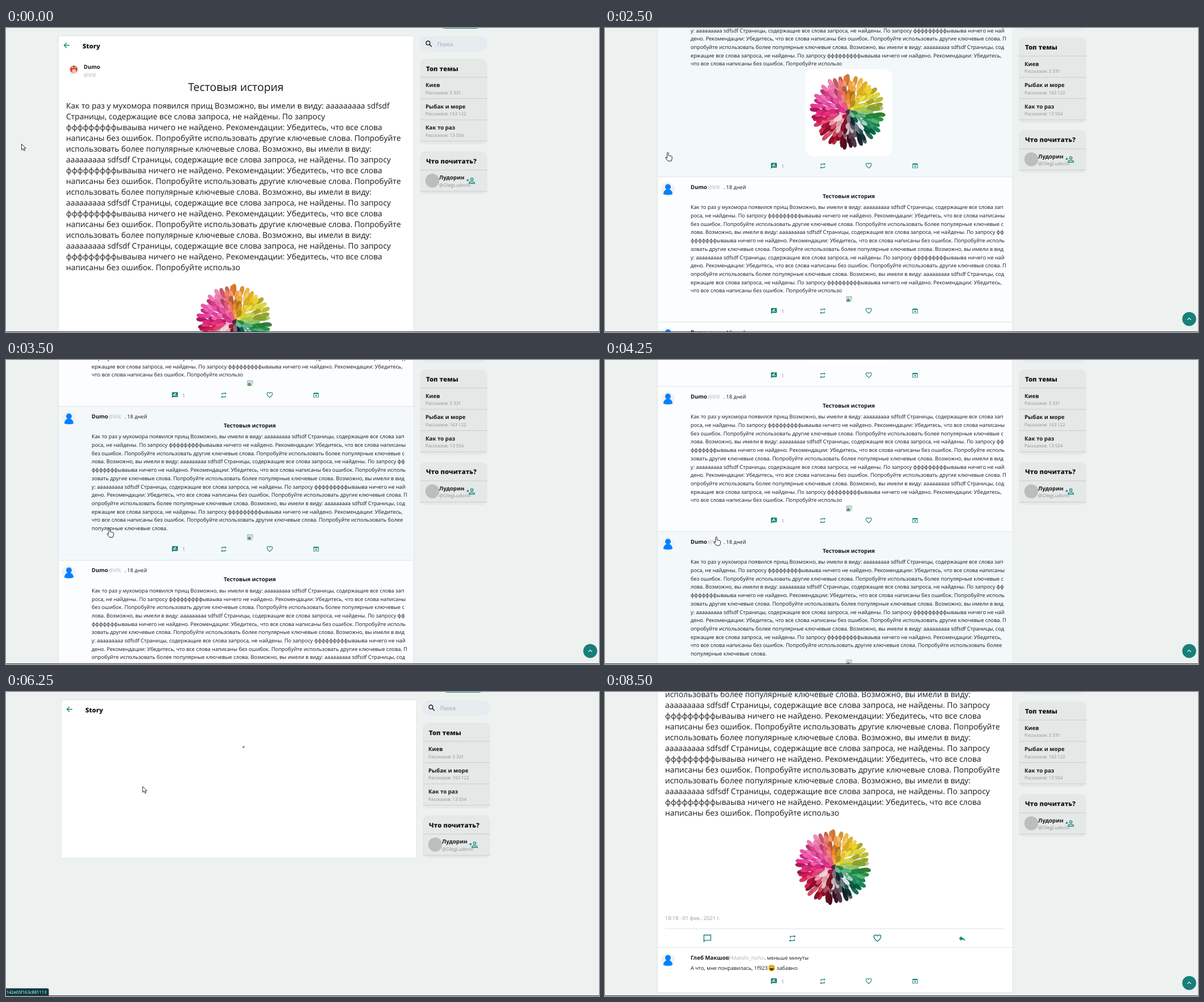
Write an HTML page that moves like this. It is 1046x536 px and loops after 8.75 s.

```html
<!DOCTYPE html>
<html lang="ru">
<head>
<meta charset="utf-8">
<title>Story feed</title>
<style>
  html, body { margin: 0; width: 100%; height: 100%; overflow: hidden; background: #edf1f0; }
  svg { display: block; width: 100vw; height: 100vh; }
  text { font-family: "Open Sans", "Noto Sans", sans-serif; text-rendering: geometricPrecision; }
</style>
</head>
<body>
<svg id="stage" viewBox="0 0 1046 536"></svg>
<script>
const LOOP = 8750;
const FAMILY = '"Open Sans", "Noto Sans", sans-serif';
const TEAL = '#17807a', INK = '#14181b', GRAY = '#8b8f90', PALE = '#adb0b1', LINE = '#dfe5e5';
const TITLE = 'Тестовыя история';
const USER = 'Dumo', HANDLE = '@Vilt';

// ---- copy ----
const found = 'Страницы, содержащие все слова запроса, не найдены. По запросу';
const advice = [
  'фффффффффываыва ничего не найдено. Рекомендации: Убедитесь, что все слова',
  'написаны без ошибок. Попробуйте использовать другие ключевые слова. Попробуйте',
  'использовать более популярные ключевые слова. Возможно, вы имели в виду:',
];
const again = 'ааааааааа sdfsdf ' + found;
const storyLines = [
  'Как то раз у мухомора появился прищ Возможно, вы имели в виду: ааааааааа sdfsdf',
  found, ...advice, again, ...advice, again, ...advice, again, advice[0],
  'написаны без ошибок. Попробуйте использо',
];
const postLines = [
  'Как то раз у мухомора появился прищ Возможно, вы имели в виду: ааааааааа sdfsdf Страницы, содержащие все слова зап',
  'роса, не найдены. По запросу фффффффффываыва ничего не найдено. Рекомендации: Убедитесь, что все слова написаны',
  'без ошибок. Попробуйте использовать другие ключевые слова. Попробуйте использовать более популярные ключевые с',
  'лова. Возможно, вы имели в виду: ааааааааа sdfsdf Страницы, содержащие все слова запроса, не найдены. По запросу фф',
  'фффффффываыва ничего не найдено. Рекомендации: Убедитесь, что все слова написаны без ошибок. Попробуйте исполь',
  'зовать другие ключевые слова. Попробуйте использовать более популярные ключевые слова. Возможно, вы имели в вид',
  'у: ааааааааа sdfsdf Страницы, содержащие все слова запроса, не найдены. По запросу фффффффффываыва ничего не най',
  'дено. Рекомендации: Убедитесь, что все слова написаны без ошибок. Попробуйте использовать другие ключевые слова. П',
  'опробуйте использовать более популярные ключевые слова. Возможно, вы имели в виду: ааааааааа sdfsdf Страницы, сод',
  'ержащие все слова запроса, не найдены. По запросу фффффффффываыва ничего не найдено. Рекомендации: Убедитесь,',
];
const shortEnd = ['что все слова написаны без ошибок. Попробуйте использо'];
const longEnd = [
  'что все слова написаны без ошибок. Попробуйте использовать другие ключевые слова. Попробуйте использовать более',
  'популярные ключевые слова.',
];

// ---- type: one size ratio per weight, so the face sets as wide as the design ----
const ruler = document.createElement('canvas').getContext('2d');
function face(weight, sample, width, size) {
  ruler.font = `${weight} 100px ${FAMILY}`;
  return { weight, ratio: width / size / (ruler.measureText(sample).width / 100) };
}
const REGULAR = face(400, advice[1], 591, 14.3);
const BOLD = face(700, TITLE, 92, 9.5);
const HEAVY = face(800, 'Что почитать?', 89, 13);

const text = (x, y, str, size, { weight, ratio } = REGULAR, fill = INK, anchor = 'start') =>
  `<text x="${x}" y="${y}" font-size="${(size * ratio).toFixed(3)}" font-weight="${weight}" fill="${fill}" text-anchor="${anchor}">${str}</text>`;
const paragraph = (x, y, lines, size, pitch) =>
  lines.map((line, i) => text(x, y + i * pitch, line, size)).join('');

// ---- shapes ----
const rect = (x, y, w, h, fill, rx = 0, extra = '') =>
  `<rect x="${x}" y="${y}" width="${w}" height="${h}" rx="${rx}" fill="${fill}" ${extra}/>`;
const circle = (x, y, r, fill) => `<circle cx="${x}" cy="${y}" r="${r}" fill="${fill}"/>`;
const rule = (x, y, w, color = LINE) => rect(x, y - 0.5, w, 1, color);
const group = (id, body, extra = '') => `<g id="${id}" ${extra}>${body}</g>`;
const use = (id, x, y) => `<use href="#${id}" x="${x}" y="${y}"/>`;

const solid = {
  review: 'M20 2H4Q2 2 2 4V22l4-4h14q2 0 2-2V4q0-2-2-2zM6 14v-2.5l7.2-7 2.5 2.4L8.5 14zm12 0h-7.5l2-2H18z',
  repeat: 'M7 7h10v3l4-4-4-4v3H5v6h2zm10 10H7v-3l-4 4 4 4v-3h12v-6h-2z',
  browser: 'M19 4H5Q3 4 3 6v12q0 2 2 2h4v-2H5V8h14v10h-4v2h4q2 0 2-2V6q0-2-2-2zm-7 6l-4 4h3v6h2v-6h3z',
  reply: 'M10 9V5l-7 7 7 7v-4.1c5 0 8.5 1.6 11 5.1-1-5-4-10-11-11z',
};
const outline = {
  back: 'M20 12H5M12 4.7L4.7 12l7.3 7.3',
  search: 'M15 9.5a5.5 5.5 0 1 0-11 0 5.5 5.5 0 0 0 11 0M13.5 13.5L20 20',
  heart: 'M12 20C5 14 3 11.5 3 8.5A4.6 4.6 0 0 1 12 6.5 4.6 4.6 0 0 1 21 8.5C21 11.5 19 14 12 20z',
  chat: 'M3 3h18v14H6l-3 3z',
  addPerson: 'M19 8a3.5 3.5 0 1 0-7 0 3.5 3.5 0 0 0 7 0M8 20v-2q1-3 7.5-3t7.5 3v2zM4 7.5v7M.5 11h7',
  up: 'M6 15l6-6 6 6',
};
function icon(kind, x, y, size, color = TEAL) {
  const place = `transform="translate(${x - size / 2} ${y - size / 2}) scale(${size / 24})"`;
  return solid[kind]
    ? `<path d="${solid[kind]}" fill="${color}" fill-rule="evenodd" ${place}/>`
    : `<path d="${outline[kind]}" fill="none" stroke="${color}" stroke-width="2.1" ${place}/>`;
}

// ---- flower: rings of petals coloured by their angle ----
const petalHues = [
  [0, 245, 140, 45], [45, 243, 214, 35], [78, 190, 205, 50], [100, 35, 165, 75], [130, 10, 125, 90],
  [155, 25, 40, 55], [180, 80, 18, 40], [205, 185, 18, 45], [245, 222, 20, 75],
  [290, 240, 50, 160], [330, 240, 85, 150], [360, 245, 140, 45],
];
function petalColor(angle, light) {
  const i = petalHues.findIndex(([a]) => a > angle);
  const [a0, ...from] = petalHues[i - 1], [a1, ...to] = petalHues[i];
  const k = (angle - a0) / (a1 - a0);
  const mixed = from.map((c, j) => {
    const v = c + (to[j] - c) * k;
    return Math.round(light > 0 ? v + (255 - v) * light : v * (1 + light));
  });
  return `rgb(${mixed})`;
}
function flower() {
  let seed = 7;
  const random = () => (seed = (seed * 16807) % 2147483647) / 2147483647;
  let out = '';
  for (let r = 54; r > 4; r -= 8) {
    const count = Math.round(r * 0.65 + 5);
    for (let i = 0; i < count; i++) {
      const angle = ((i + random() * 0.7) * 360 / count) % 360;
      const reach = r + random() * 6 - 3;
      const glow = r < 36 && angle > 120 && angle < 270 ? 0.4 : 0;
      const light = random() * 0.6 - 0.3 + glow * random() * 1.8;
      out += `<path d="M0 11Q-5.5 1-3-8Q0-13 3-8Q5.5 1 0 11z" fill="${petalColor(angle, light)}" stroke="#000" stroke-opacity=".18" stroke-width=".6" transform="rotate(${angle.toFixed(1)}) translate(0 ${(-reach).toFixed(1)})"/>`;
    }
  }
  return out + circle(0, 0, 3.5, '#253c38');
}

const defs = `<defs>
  ${group('flower', rect(-75, -76, 154, 154, '#fff', 15) + flower())}
  ${group('person', circle(0, 0, 12, '#eff2f4') + circle(0, -4.2, 5, '#0080ff') +
    '<path d="M-8 8.5C-8 3-4-.5 0-.5S8 3 8 8.5Q0 11-8 8.5z" fill="#0080ff"/>')}
  ${group('missing', rect(-4.5, -4.5, 9, 9, '#d3e0f2', 0, 'stroke="#a3a8ad"') +
    '<path d="M-4 4V1l3-2.5L4 4z" fill="#57a546"/><path d="M1 4.5l4-3.5v3.5z" fill="#fff"/>')}
</defs>`;

// ---- pages ----
const panel = (height) => rect(92.5, 14, 626.5, height, '#fff', 0, `class="panel" stroke="${LINE}"`);
const storyHeader = icon('back', 107, 30.5, 15) + text(135, 36, 'Story', 13, HEAVY);

const actions = (y) =>
  icon('review', 298, y, 12.5) + text(311, y + 3.5, '1', 9.5, REGULAR, GRAY) +
  icon('repeat', 384, y, 12.5) + icon('heart', 465.2, y, 12.5) + icon('browser', 547, y, 12.5);

const storyPage = panel(725) + storyHeader +
  circle(119.5, 74, 9, '#f3efec') + circle(119.5, 73, 6.5, '#d2402c') +
  circle(120, 76, 3.6, '#f0c9a8') + circle(117, 69.5, 1.3, '#fff') + circle(122, 69.8, 1.1, '#fff') +
  text(137, 71.5, USER, 9.5, BOLD) + text(137, 86, HANDLE, 9.5, REGULAR, PALE) +
  text(405.5, 110.5, TITLE, 20, REGULAR, INK, 'middle') +
  paragraph(106, 142, storyLines, 14.3, 19.03) +
  use('flower', 402.5, 518) +
  text(106, 611, '18:18 · 01 фев.. 2021 г.', 9.5, REGULAR, '#999c9d') +
  rule(106, 626.5, 599) +
  icon('chat', 180.5, 643.5, 16) + icon('repeat', 330.5, 643.5, 15) +
  icon('heart', 480.5, 643.5, 16) + icon('reply', 630, 643.5, 15) +
  rule(93, 659.5, 626) +
  use('person', 111, 682) +
  text(151, 681, 'Глеб Макшов', 9.5, BOLD) + text(215, 681, '@Makshi_hoho', 9.5, REGULAR, PALE) +
  text(281, 681, '. меньше минуты', 9.5) +
  text(151, 699, 'А что, мне понравилась, 1f923', 9.5) + text(303, 699, 'забавно', 9.5) +
  circle(294, 695.5, 6, '#f5b82e') +
  '<path d="M290 696h8q-.5 4-4 4t-4-4z" fill="#5a3312"/><path d="M290.5 694l2-1.5M297.5 694l-2-1.5" stroke="#5a3312"/>' +
  actions(719);

const loaderPage = panel(279) + storyHeader +
  `<path d="M412.7 98.2l2.8-2.2" stroke="${TEAL}" stroke-width="2.2"/>`;

const posts = [
  { top: 47, height: 400, age: '12 минут', end: shortEnd, picture: 'flower' },
  { top: 447, height: 256, age: '18 дней', end: shortEnd },
  { top: 703, height: 271.5, age: '18 дней', end: longEnd },
  { top: 974.5, height: 271.5, age: '18 дней', end: longEnd },
];
const post = ({ top, height, age, end, picture }) =>
  rect(93, top, 626, height, 'transparent', 0, 'class="post"') + rule(93, top + height - 0.5, 626) +
  use('person', 111, top + 21.5) +
  text(151, top + 20.7, USER, 9.5, BOLD) + text(181, top + 20.7, HANDLE, 9.5, REGULAR, PALE) +
  text(209, top + 20.7, '. ' + age, 9.5) +
  text(430, top + 36.7, TITLE, 9.5, BOLD, INK, 'middle') +
  paragraph(151, top + 56.3, [...postLines, ...end], 9.51, 14.7) +
  (picture ? use(picture, 428, top + 285) : use('missing', 430.5, top + height - 41)) +
  actions(top + height - 20);

const listPage = panel(1300) + posts.map(post).join('') +
  text(101, 36, 'Главная', 13, HEAVY) + rule(93, 46.5, 69);

// ---- sidebar ----
const topics = [['Киев', '3 331'], ['Рыбак и море', '163 122'], ['Как то раз', '13 554']];
const CARD = '#e4e8e7', CARD_LINE = '#c9cfce';
const sidebar = rect(762, -24, 79, 25, TEAL, 12.5) +
  rect(729.5, 14.5, 119.5, 27, '#e6ebf0', 13.5) + icon('search', 746, 28, 15, '#111') +
  text(761, 31.7, 'Поиск', 9.6, REGULAR, '#9a9fa5') +
  rect(730, 54, 119, 151, CARD, 10) + text(741, 75.8, 'Топ темы', 13, HEAVY) + rule(730, 87, 119, CARD_LINE) +
  topics.map(([topic, count], i) => {
    const y = 87 + i * 37.5;
    return text(740, y + 17, topic, 9.5, BOLD) +
      text(740, y + 29.8, 'Рассказов: ' + count, 8.2, REGULAR, GRAY) + rule(730, y + 37.5, 119, CARD_LINE);
  }).join('') +
  rect(730, 217.5, 119, 75.5, CARD, 10) + text(741, 238.7, 'Что почитать?', 13, HEAVY) +
  rule(730, 250.5, 119, CARD_LINE) + rule(730, 288, 119, CARD_LINE) +
  circle(752, 269, 12.3, '#bcbdbd') + text(764, 267.2, 'Лудорин', 9.5, BOLD) +
  text(764, 279.8, '@OlegLudorin', 8.6, REGULAR, GRAY) + icon('addPerson', 819.5, 269, 15);

// ---- overlay ----
const pointer = 'fill="#fff" stroke="#111" stroke-width=".9" stroke-linejoin="round"';
const overlay =
  group('toTop', circle(1030.5, 513, 12.3, TEAL) + icon('up', 1030.5, 513, 13, '#fff')) +
  group('status', '<path/>' + text(0, 531.8, '', 7.8, REGULAR, '#fff', 'end')) +
  rect(0, 535, 1046, 1, '#3a3d3e') +
  group('arrow', '<path d="M0 0V10.5L2.5 8.2 4.2 12 6 11.2 4.4 7.6H7.6Z"/>', pointer) +
  group('hand', '<path d="M0 1.2a1.3 1.3 0 0 1 2.6 0V5.5l5 1q1.5.4 1.3 2L8.3 12.5 7.5 15H1.5L-2.5 10q-.8-1.8.9-1.5L0 10z"/>', pointer);

const stage = document.getElementById('stage');
stage.innerHTML = defs + group('root',
  group('page', group('story', storyPage) + group('list', listPage) + group('loader', loaderPage)) +
  group('sidebar', sidebar)) + overlay;

// ---- timeline: ms, view, scroll, pointer, x, y, hovered post, status ----
const LINK_A = { label: '072fc2f4120b099b7f0', width: 73, fill: '#3a6166' };
const LINK_B = { label: '9c142e05f163c881113', width: 75.5, fill: '#04393f' };
const steps = [
  [0, 'story', 0, 'arrow', 27.5, 204.5],
  [250, 'story', 0, 'arrow', 120, 190],
  [500, 'story', 0, 'arrow', 262, 150],
  [750, 'story', 0, 'arrow', 200, 90],
  [1000, 'story', 0, 'arrow', 130, 50],
  [1250, 'story', 0, 'hand', 106, 26],
  [1500, 'list', 0],
  [2000, 'list', 40, 'hand', 108, 150, 0],
  [2250, 'list', 115, 'hand', 109, 200, 0],
  [2500, 'list', 184, 'hand', 109.5, 219.5, 0],
  [2750, 'list', 300, 'hand', 130, 245, 1],
  [3000, 'list', 410, 'hand', 150, 265, 1],
  [3250, 'list', 520, 'hand', 168, 285, 2],
  [3500, 'list', 621, 'hand', 181, 297.5, 2],
  [3750, 'list', 640, 'hand', 188, 303, 2],
  [4000, 'list', 560, 'hand', 192, 308, 2],
  [4250, 'list', 400, 'hand', 195, 312, 2],
  [4500, 'list', 250, 'hand', 198, 315, 1],
  [4750, 'list', 150, 'hand', 200, 318, 1],
  [5000, 'list', 116.5, 'hand', 200, 318, -1, LINK_A],
  [5250, 'list', 60, 'hand', 210, 270, 0, LINK_B],
  [5500, 'list', 0, 'hand', 228, 200, 0, LINK_B],
  [5750, 'list', 0, 'hand', 240, 167, 0, LINK_B],
  [6250, 'loader', 0, 'arrow', 241, 166.5, -1, LINK_B],
  [6500, 'story', 0, 'arrow', 244, 190],
  [6750, 'story', 0, 'arrow', 248, 220],
  [7000, 'story', 110, 'arrow', 250, 245],
  [7250, 'story', 200, 'arrow', 250, 260],
  [7500, 'story', 209, 'arrow', 246, 270],
  [8000, 'story', 209, 'arrow', 150, 230],
  [8250, 'story', 209, 'arrow', 14, 180],
  [8500, 'story', 209],
];

const $ = (id) => document.getElementById(id);
const show = (id, on) => $(id).setAttribute('display', on ? 'inline' : 'none');
const move = (id, x, y) => $(id).setAttribute('transform', `translate(${x} ${y})`);
const panels = stage.querySelectorAll('.panel'), postBoxes = stage.querySelectorAll('.post');

function render([, view, scroll, cursor, x, y, hovered = -1, link]) {
  for (const id of ['story', 'list', 'loader']) show(id, id === view);
  // The short page has no scrollbar, so its centred layout shifts right.
  move('root', view === 'loader' ? 5 : 0, 0);
  move('page', 0, -scroll);
  move('sidebar', 0, -Math.min(scroll, 37.5));
  show('toTop', scroll > 60);
  panels.forEach((p) => p.setAttribute('fill', hovered >= 0 && scroll ? '#fbfdfe' : '#fff'));
  postBoxes.forEach((p, i) => p.setAttribute('fill', i === hovered ? '#f3f8fb' : 'transparent'));
  for (const id of ['arrow', 'hand']) show(id, id === cursor);
  if (cursor) move(cursor, x, y);
  show('status', link);
  if (link) {
    const [box, label] = $('status').children;
    box.setAttribute('d', `M0 522.5H${link.width - 3}q3 0 3 3V535H0z`);
    box.setAttribute('fill', link.fill);
    label.setAttribute('x', link.width - 4);
    label.textContent = link.label;
  }
}

const start = performance.now();
let current;
function tick() {
  const time = (performance.now() - start) % LOOP;
  const step = steps.findLast(([at]) => at <= time);
  if (step !== current) render(current = step);
  requestAnimationFrame(tick);
}
tick();
</script>
</body>
</html>
```
